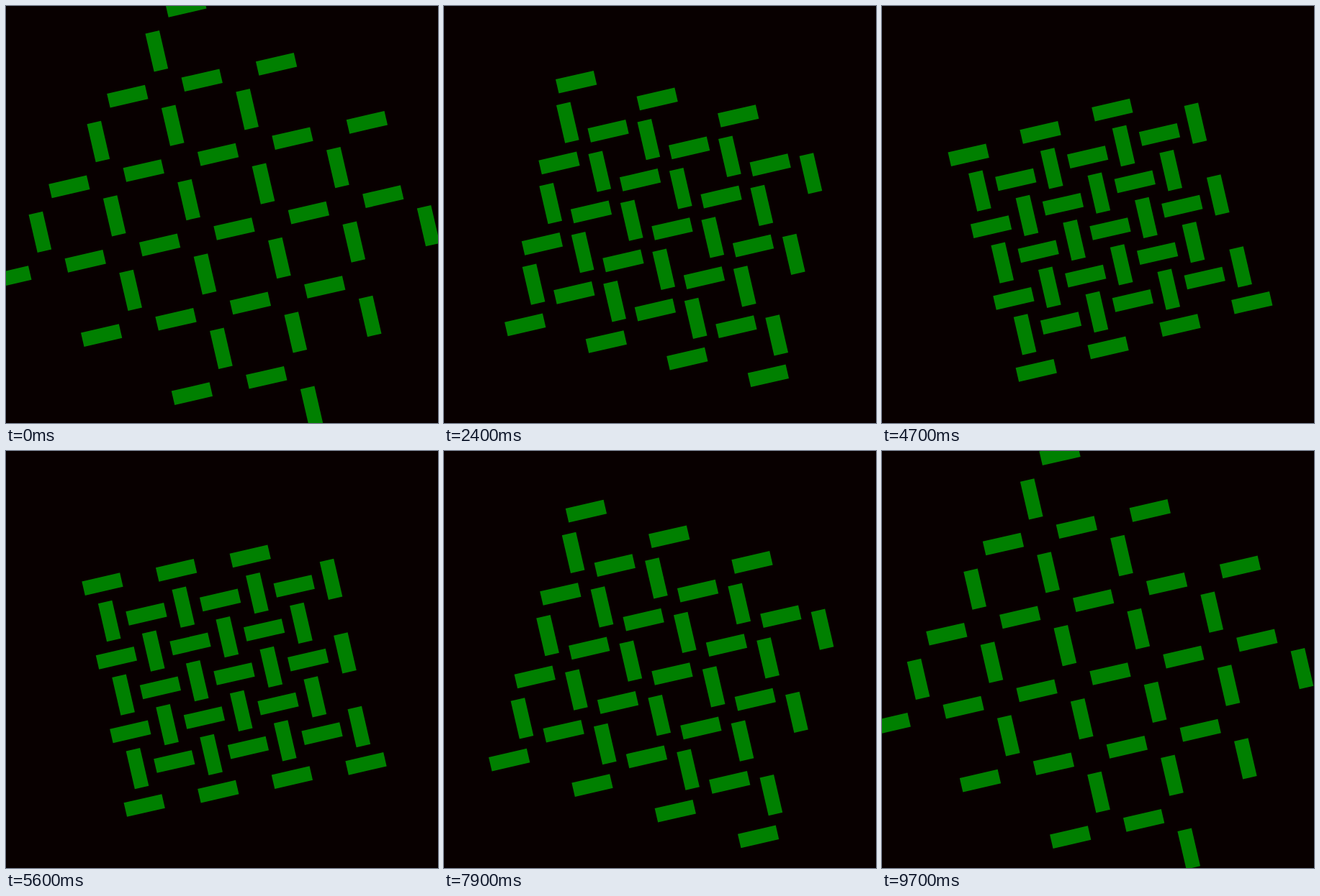
Write an HTML page that moves like this. It is 600 by 580 pixels and loops after 9800 ms.

```html
<!DOCTYPE html>
<html lang="en">
<head>
<meta charset="utf-8">
<title>Shearing bar lattice</title>
<style>
html, body { margin: 0; width: 100%; height: 100%; overflow: hidden; background: #080000; }
svg { display: block; }
</style>
</head>
<body>
<svg width="600" height="580" viewBox="0 0 600 580">
  <rect width="600" height="580" fill="#080000"/>
  <g id="bars" fill="#008000" transform="translate(317 310) rotate(-13)"></g>
</svg>
<script>
const STEP = 100, STEPS = 98;
const LENGTH = 54.2, WIDTH = 20;
const SPACING = 52.17, SHIFT_MAX = 53.6, SHIFT_MIN = -6.5;
const group = document.getElementById('bars');
const bars = [];

function addBar(i, j) {
  const upright = (i + j) % 2 !== 0;
  const w = upright ? WIDTH : LENGTH;
  const h = upright ? LENGTH : WIDTH;
  const el = document.createElementNS('http://www.w3.org/2000/svg', 'rect');
  el.setAttribute('width', w);
  el.setAttribute('height', h);
  group.appendChild(el);
  bars.push({ el, i, j, w, h });
}

// Top and bottom rows hold only flat bars, the last column only upright ones,
// apart from the closing corner.
function present(i, j) {
  const upright = (i + j) % 2 !== 0;
  if (i === 3 && j === 3) return true;
  if (i === 3 && !upright) return false;
  return !(Math.abs(j) === 3 && upright);
}

for (let j = -3; j <= 3; j++)
  for (let i = -3; i <= 3; i++)
    if (present(i, j)) addBar(i, j);

function draw(ms) {
  const step = Math.floor(ms / STEP) % STEPS;
  const half = STEPS / 2;
  const closed = 1 - Math.abs(step - half) / half;
  const shift = SHIFT_MAX + (SHIFT_MIN - SHIFT_MAX) * closed;
  for (const { el, i, j, w, h } of bars) {
    el.setAttribute('x', (i * SPACING - j * shift - w / 2).toFixed(2));
    el.setAttribute('y', (i * shift + j * SPACING - h / 2).toFixed(2));
  }
}

const start = performance.now();
function tick() {
  draw(performance.now() - start);
  requestAnimationFrame(tick);
}
draw(0);
requestAnimationFrame(tick);
</script>
</body>
</html>
```
